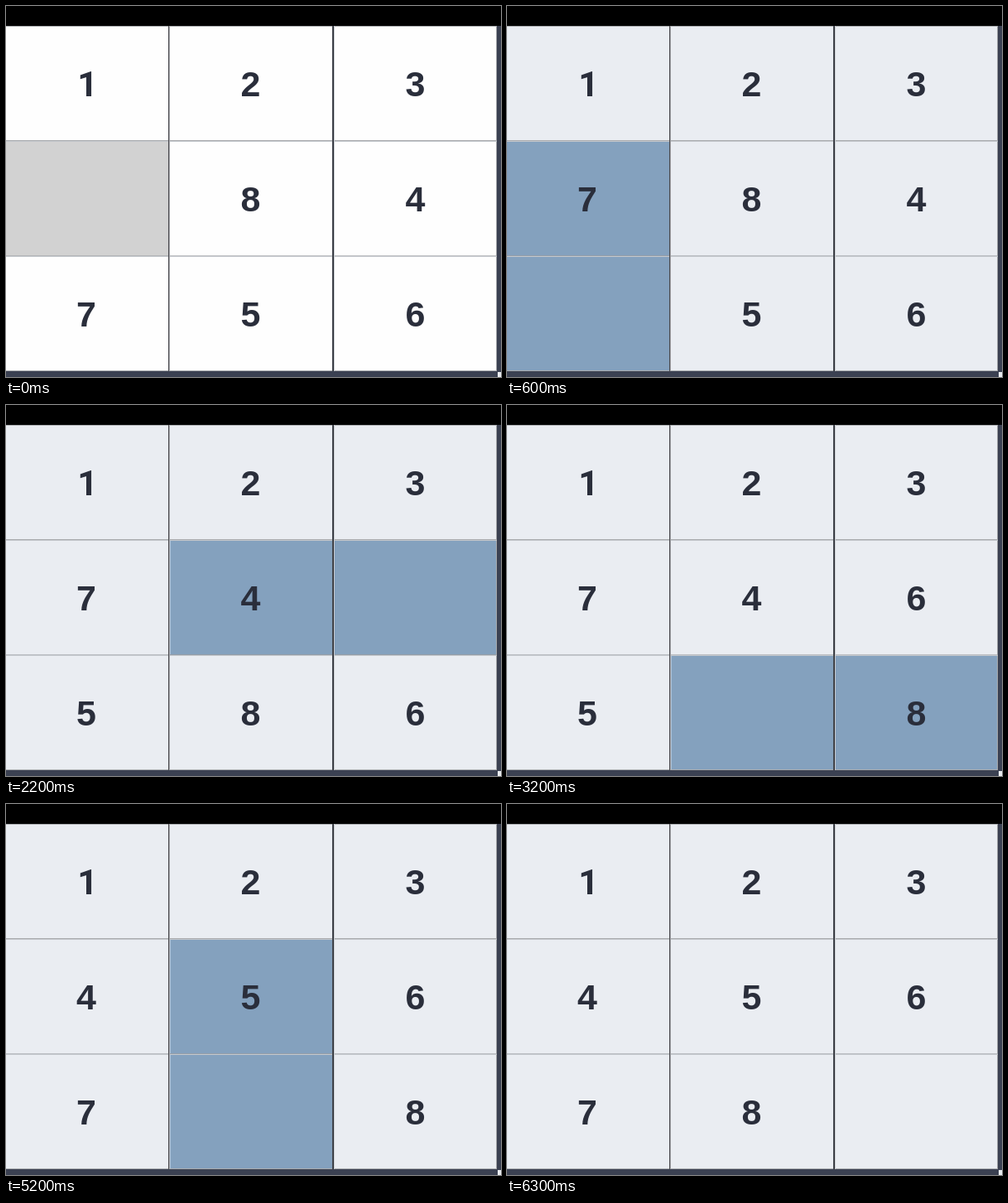
Write an HTML page that moves like this. It is 598 by 448 pixels and loops after 7300 ms.

```html
<!DOCTYPE html>
<html lang="en">
<head>
<meta charset="utf-8">
<title>Sliding puzzle</title>
<style>
html, body { margin: 0; width: 100%; height: 100%; overflow: hidden; background: #000; }
svg { display: block; width: 598px; height: 448px; }
text { font: bold 43px "Liberation Sans", Arial, sans-serif; fill: #2a2e3b; text-anchor: middle; }
/* a numeral one without a foot */
text.plain { font-family: Roboto, sans-serif; transform: translateX(1.5px); }
</style>
</head>
<body>
<svg viewBox="0 0 598 448" shape-rendering="crispEdges">
  <rect width="598" height="448" fill="#000"/>
  <rect y="24" width="598" height="424" fill="#3b4152"/>
  <rect x="594" y="442" width="4" height="6" fill="#eaedf2"/>
  <g id="cells"></g>
  <g id="edges"></g>
  <g fill="#a9abae">
    <rect y="24" width="593" height="1"/>
    <rect y="162" width="593" height="1"/>
    <rect y="301" width="593" height="1" fill-opacity=".7"/>
    <rect y="440" width="593" height="1"/>
    <rect x="592" y="24" width="1" height="417"/>
  </g>
  <g fill="#c4c8cd">
    <rect y="163" width="593" height="1"/>
    <rect y="302" width="593" height="1"/>
    <rect x="396" y="24" width="1" height="417"/>
  </g>
  <rect x="196" y="24" width="1" height="417" fill="#4b4b50"/>
  <rect x="197" y="24" width="1" height="417" fill="#a3a4a8"/>
  <rect x="394" y="24" width="1" height="417" fill="#50545c"/>
  <rect x="395" y="24" width="1" height="417" fill="#2b2d34"/>
  <g id="digits"></g>
</svg>
<script>
const LOOP = 7300, START = 100, FIRST = 600, STEP = 500, END = 6300;
const WHITE = '#fefefe', GREY = '#d2d2d2', LIGHT = '#eaedf2', BLUE = '#84a1be';
const COLS = [0, 197, 395, 593], ROWS = [24, 163, 302, 441];
const CENTERS = [97, 295.5, 494.5], BASELINES = [109, 248, 387];
const SHUFFLED = [1, 2, 3, 0, 8, 4, 7, 5, 6];
// Cells the gap visits, numbered row by row
const PATH = [3, 6, 7, 4, 5, 8, 7, 6, 3, 4, 7, 8];

const add = (id, tag, attrs) => {
  const el = document.createElementNS('http://www.w3.org/2000/svg', tag);
  for (const key in attrs) el.setAttribute(key, attrs[key]);
  return document.getElementById(id).appendChild(el);
};

const cells = SHUFFLED.map((_, i) => {
  const c = i % 3, r = Math.floor(i / 3);
  const x = COLS[c], y = ROWS[r], width = COLS[c + 1] - x, height = ROWS[r + 1] - y;
  return {
    face: add('cells', 'rect', { x, y, width, height }),
    edges: [
      add('edges', 'rect', { x: x + 1, y, width: c ? 1 : 0, height, fill: '#a9c0d8' }),
      add('edges', 'rect', { x, y: y + height - 1, width, height: 1, fill: '#647e9b' })
    ],
    label: add('digits', 'text', { x: CENTERS[c], y: BASELINES[r] })
  };
});

function boardAfter(moves) {
  const board = [...SHUFFLED];
  for (let i = 1; i <= moves; i++) {
    board[PATH[i - 1]] = board[PATH[i]];
    board[PATH[i]] = 0;
  }
  return board;
}

function draw(t) {
  const moves = t < FIRST ? 0 : Math.min(PATH.length - 1, Math.floor((t - FIRST) / STEP) + 1);
  const active = moves && t < END ? [PATH[moves - 1], PATH[moves]] : [];
  const board = boardAfter(moves);
  cells.forEach(({ face, edges, label }, i) => {
    const lit = active.includes(i);
    const idle = t < START ? (board[i] ? WHITE : GREY) : LIGHT;
    face.setAttribute('fill', lit ? BLUE : idle);
    edges.forEach(e => e.setAttribute('visibility', lit ? 'visible' : 'hidden'));
    label.textContent = board[i] || '';
    label.classList.toggle('plain', board[i] === 1);
  });
}

const origin = performance.now();
function frame() {
  draw((performance.now() - origin) % LOOP);
  requestAnimationFrame(frame);
}
frame();
</script>
</body>
</html>
```
